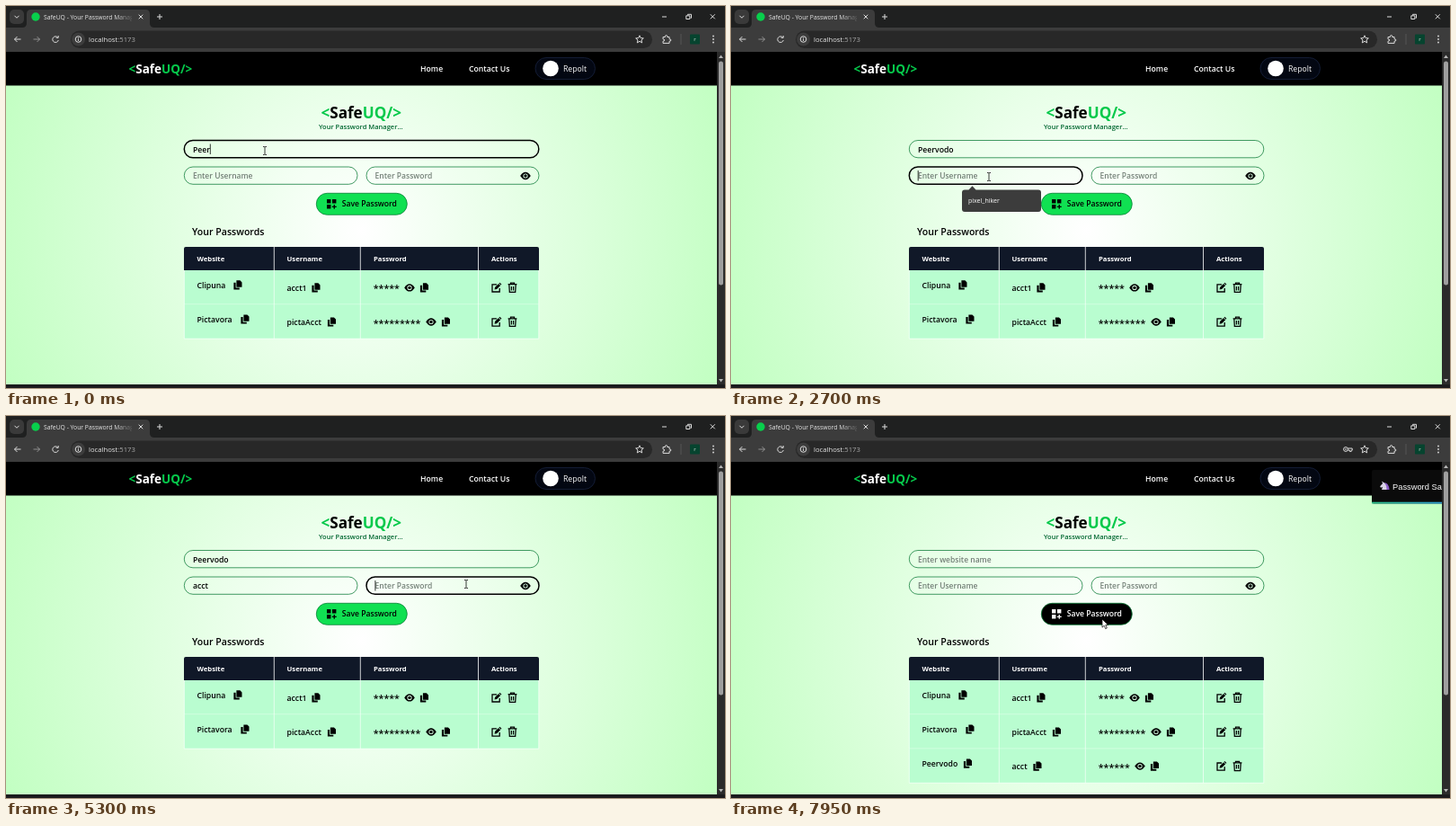
An HTML page for the animation above (8000 ms loop, 800 by 425 pixels).

```html
<!DOCTYPE html>
<html lang="en">
<head>
<meta charset="utf-8">
<title>Password manager</title>
<style>
  html, body { margin: 0; width: 100%; height: 100%; overflow: hidden; background: #000; }
  svg { display: block; width: 100vw; height: 100vh; }
  text { font: 600 8.7px "Open Sans", "Noto Sans", sans-serif; }
  .chrome { font-weight: 400; fill: #e6e6e6; }
  .logo { font-weight: 700; }
  .green { fill: #06c94b; }
  .head { font-size: 7.7px; font-weight: 700; fill: #fff; }
  .stars { font-size: 10.7px; }
  .toast { font: 400 9.3px "Liberation Sans", Arial, sans-serif; fill: #fff; }
  .line { fill: none; stroke: #dcdcdc; stroke-width: 1; }
  .field rect { fill: #fff; fill-opacity: .12; }
</style>
</head>
<body>
<svg viewBox="0 0 800 425" preserveAspectRatio="none">
  <defs>
    <radialGradient id="glow">
      <stop stop-color="#fff"/><stop offset="1" stop-color="#bfffbf"/>
    </radialGradient>
    <linearGradient id="fade">
      <stop offset=".74" stop-color="#e6e6e6"/><stop offset=".93" stop-color="#e6e6e6" stop-opacity=".1"/>
    </linearGradient>
    <linearGradient id="progress">
      <stop stop-color="#2fc58b"/><stop offset=".4" stop-color="#2f9fd0"/><stop offset="1" stop-color="#5856d6"/>
    </linearGradient>
    <clipPath id="page"><rect y="51" width="791" height="370"/></clipPath>
    <clipPath id="tabText"><rect x="40" width="100" height="24"/></clipPath>
    <g id="copy"><path d="M-1.6-5.1h4l2.1 2.1v5.3h-6.1zM-4.6-2.6h2.2v5.8h4.2v1.9h-6.4z"/></g>
    <g id="eye">
      <path d="M-5.8 0Q-3-4.2 0-4.2T5.8 0Q3 4.2 0 4.2T-5.8 0Z"/>
      <circle r="2.6" fill="#d5fbe0"/><circle r="1.7"/>
    </g>
    <g id="edit">
      <path d="M.5-3.6h-5v8.2h8.2v-4" fill="none" stroke="#000" stroke-width="1.3"/>
      <path d="M-2 2.2l.5-2.6 4-4 2.1 2.1-4 4zM3-4.9l.9-.8 2 2-.8.9z"/>
    </g>
    <g id="trash">
      <path d="M-4.9-3.7H4.9M-2-4V-5.3H2V-4M-3.7-3.5l.5 8.4h6.4l.5-8.4M-1.1-1.5v4.5M1.1-1.5v4.5" fill="none" stroke="#000" stroke-width="1.25"/>
    </g>
  </defs>

  <!-- browser frame -->
  <rect width="800" height="425" fill="#1f2020"/>
  <rect x="4" y="4" width="16" height="16" rx="5" fill="#3a3a3a"/>
  <path class="line" d="M9.5 10.8l2.5 2.5 2.5-2.5"/>
  <path d="M18 24q5 0 5-5V9q0-5 5-5H155q5 0 5 5V19q0 5 5 5z" fill="#3c3c3c"/>
  <rect y="24" width="800" height="27" fill="#3c3c3c"/>
  <circle cx="33" cy="12" r="4.7" fill="#08cf4c"/>
  <text class="chrome" x="42" y="14.6" clip-path="url(#tabText)" style="font-size:6.8px;fill:url(#fade)">SafeUQ - Your Password Manager</text>
  <path class="line" d="M147.7 9.7l4.6 4.6m0-4.6l-4.6 4.6M171 9v6m-3-3h6M730 12h5M783.8 9.3l5 5m0-5l-5 5M758.5 10.3v-1h4v4h-1M756.8 10.8h4v3.7h-4z"/>
  <path class="line" d="M16.5 37h-7m3-3l-3 3 3 3M57.6 35a3.3 3.3 0 1 0 .7 3M58.2 33v2.3h-2.4"/>
  <path class="line" d="M30.5 37h7m-3-3l3 3-3 3" stroke-opacity=".5"/>
  <rect x="72" y="27.5" width="647" height="19.5" rx="9.7" fill="#282828"/>
  <circle cx="80.5" cy="37" r="7.5" fill="#3c3c3c"/>
  <circle class="line" cx="80.5" cy="37" r="3.3"/>
  <path class="line" d="M80.5 36.6v2.2m0-3.9v.9"/>
  <text class="chrome" x="92" y="39.8" style="font-size:7.7px">localhost<tspan fill="#aaa">:5173</tspan></text>
  <g id="keyIcon" class="line"><circle cx="684" cy="37" r="2.4"/><circle cx="684" cy="37" r=".4"/><path d="M686.2 36h5v2.2h-1v1.2h-1.8v-1.3h-2.2"/></g>
  <path class="line" d="M705 32.8l1.2 2.8 3.1.3-2.3 2 .7 3-2.7-1.6-2.7 1.6.7-3-2.3-2 3.1-.3z"/>
  <path class="line" d="M731 34.5h2.4q-.3-2 1.2-2t1.2 2h2.3v2.4q1.8-.2 1.8 1.1t-1.8 1.1v2.3H731v-2.2q1.7 0 1.7-1.2T731 36.8z"/>
  <path d="M751 31v12" stroke="#555"/>
  <rect x="761" y="31.5" width="11" height="11" rx="1" fill="#06442f"/>
  <text class="chrome" x="765.2" y="39.2" style="font-size:6px">r</text>
  <g fill="#dcdcdc"><circle cx="787" cy="33.5" r=".9"/><circle cx="787" cy="37" r=".9"/><circle cx="787" cy="40.5" r=".9"/></g>

  <!-- page -->
  <g clip-path="url(#page)"><circle cx="395" cy="250" r="450" fill="url(#glow)"/></g>
  <rect y="51" width="791" height="37.5"/>
  <text class="logo" x="136.5" y="75.2" fill="#fff" style="font-size:13.5px"><tspan class="green">&lt;</tspan>Safe<tspan class="green">UQ/&gt;</tspan></text>
  <g fill="#fff">
    <text x="461" y="73">Home</text>
    <text x="515" y="73">Contact Us</text>
    <rect x="589" y="57.5" width="66.5" height="24" rx="12" fill="#030712" stroke="#18233f" stroke-width=".8"/>
    <circle cx="606" cy="69.5" r="8.8"/>
    <text x="620" y="73" style="font-weight:500">Repolt</text>
  </g>
  <text class="logo" x="350.5" y="125" style="font-size:17.1px"><tspan class="green">&lt;</tspan>Safe<tspan class="green">UQ/&gt;</tspan></text>
  <text x="348" y="137" fill="#016630" style="font-size:7.5px">Your Password Manager...</text>
  <g id="fields"></g>
  <use href="#eye" x="578" y="189"/>
  <g id="button">
    <rect x="345.3" y="208.3" width="101" height="24" rx="12" stroke="#0b7f38" stroke-width=".8"/>
    <path class="ink" d="M357 215h4.4v4.4H357zM363 215h4.4v4.4H363zM357 221h4.4v4.4H357zM364.6 221h1.3v1.7h1.8v1.3h-1.8v1.7h-1.3v-1.7h-1.8v-1.3h1.8z"/>
    <text class="ink" x="373.7" y="223.4" style="font-size:8.6px">Save Password</text>
  </g>
  <text x="207" y="254.8" style="font-size:10.6px">Your Passwords</text>
  <path d="M198 294V270q0-2 2-2H591q2 0 2 2V294z" fill="#101828"/>
  <path d="M298.3 268v26M394.3 268v26M525.5 268v26" stroke="#fff" stroke-width=".8"/>
  <text class="head" x="212.5" y="284">Website</text>
  <text class="head" x="312.5" y="284">Username</text>
  <text class="head" x="409" y="284">Password</text>
  <text class="head" x="540" y="284">Actions</text>
  <g id="rows"></g>

  <!-- autofill suggestion -->
  <g id="popup">
    <path d="M260 204.5h4.5l4-4.3 4 4.3h69.5q3 0 3 3v18.5q0 3-3 3h-82q-3 0-3-3v-18.5q0-3 3-3z" fill="#3c3c3c"/>
    <text class="chrome" x="264" y="219.3" style="font-size:7px;fill:#fff">pixel_hiker</text>
  </g>

  <!-- notification -->
  <g clip-path="url(#page)"><g id="toast">
    <rect y="60" width="187" height="37.5" rx="2" fill="#0b0b0b"/>
    <rect y="95.7" width="187" height="1.8" fill="url(#progress)"/>
    <path d="M11 82l1-3-2 .8-.9-1.5 3-3.3L11 72.5l3 2q4 .5 4.5 7.5z" fill="#d9d3e6"/>
    <path d="M14 74.3q4.8 0 5.5 7.7h-3q.5-4-2.5-7.7z" fill="#8a5cc7"/>
    <text class="toast" x="23" y="81.7">Password Saved!</text>
  </g></g>

  <!-- scrollbar and bottom edge -->
  <rect x="791" y="51" width="9" height="370" fill="#2b2b2b"/>
  <rect x="793" y="61.5" width="5" height="249" rx="2.5" fill="#9f9f9f"/>
  <path d="M793 58l2.5-3.5 2.5 3.5zM793 415l2.5 3.5 2.5-3.5z" fill="#b5b5b5"/>
  <rect y="421.5" width="800" height="4" fill="#1b1a1d"/>

  <path id="ibeam" d="M-2-4.5h1.4l.6.5.6-.5H2M-2 4.5h1.4L0 4l.6.5H2M0-4V4" fill="none" stroke="#222" stroke-width=".9"/>
  <path id="arrow" d="M0 0V9.2L2.2 7.2 3.7 10.7 5.3 10 3.8 6.6H6.7z" fill="#fff" stroke="#000" stroke-width=".7"/>
</svg>
<script>
const LOOP = 8000, SAVE_AT = 7700, TOAST_AT = 7708;
const $ = id => document.getElementById(id);

// keys: times at which each character has been typed
const fields = [
  { x: 198.3, y: 149.5, w: 394.5, hint: "Enter website name", value: "Peervodo",
    keys: [0, 0, 0, 0, 100, 210, 330, 450], focus: 0, blur: 2550 },
  { x: 198.3, y: 179, w: 192.7, hint: "Enter Username", value: "acct",
    keys: [3150, 3300, 3480, 3640], focus: 2550, blur: 5000 },
  { x: 401, y: 179, w: 192, hint: "Enter Password", value: "••••••",
    keys: [5850, 6050, 6240, 6440, 6620, 6850], focus: 5000, blur: SAVE_AT },
];
const pointerPath = [
  [0, 288, 161], [1500, 288, 161], [1850, 286, 175.5], [2250, 286, 175.5], [2500, 287, 190],
  [3950, 287, 190], [4800, 512, 187], [6950, 512, 187], [7500, 413, 226], [LOOP, 413, 226],
];
const savedRows = [
  { site: "Clipuna", siteIcon: 258, login: "acct1", loginIcon: 345, stars: 5, eye: 449 },
  { site: "Pictavora", siteIcon: 266, login: "pictaAcct", loginIcon: 362.5, stars: 9, eye: 473 },
  { site: "Peervodo", siteIcon: 263.5, login: "acct", loginIcon: 341, stars: 6, eye: 455 },
];

const icon = (name, x, y) => `<use href="#${name}" x="${x}" y="${y}"/>`;
$("rows").innerHTML = savedRows.map((r, i) => {
  const y = 294 + 38.1 * i, mid = y + 19.4;
  const dividers = [198.3, 298.3, 394.3, 525.5, 592.8].map(x => `M${x} ${y}v38.1`).join("");
  return `<g><rect x="198.3" y="${y}" width="394.5" height="38.1" fill="#b9fdd0"/>
    <path d="M198.3 ${y + 38.1}h394.5${dividers}" stroke="#fff" stroke-width=".8" stroke-opacity=".8"/>
    <text x="212.5" y="${mid + .3}">${r.site}</text>${icon("copy", r.siteIcon, mid - 3)}
    <text x="312.5" y="${mid + 3.2}">${r.login}</text>${icon("copy", r.loginIcon, mid)}
    <text class="stars" x="408.7" y="${mid + 5}">${"*".repeat(r.stars)}</text>
    ${icon("eye", r.eye, mid)}${icon("copy", r.eye + 16.5, mid)}
    ${icon("edit", 545.5, mid)}${icon("trash", 563.5, mid)}</g>`;
}).join("");
const newRow = $("rows").lastElementChild;

$("fields").innerHTML = fields.map(f => `<g class="field">
  <rect x="${f.x}" y="${f.y}" width="${f.w}" height="19.3" rx="9.65"/>
  <text x="${f.x + 9.6}" y="${f.y + 13.1}"></text>
  <path stroke="#000" stroke-width=".8"/></g>`).join("");
fields.forEach((f, i) => [f.box, f.text, f.caret] = $("fields").children[i].children);

const show = (node, on) => node.style.display = on ? "" : "none";
const inside = (x, y, left, top, w, h) => x >= left && x <= left + w && y >= top && y <= top + h;

function drawField(f, t) {
  const typed = f.keys.filter(k => k <= t), focused = t >= f.focus && t < f.blur;
  const value = t < SAVE_AT ? f.value.slice(0, typed.length) : "";
  f.text.textContent = value || f.hint;
  f.text.style.fill = value ? "#000" : "#748078";
  f.text.style.fontSize = !value ? "8.5px" : value[0] === "•" ? "10px" : "";
  f.box.setAttribute("stroke", focused ? "#000" : "#16803f");
  f.box.setAttribute("stroke-width", focused ? 1.5 : .8);
  const lastInput = Math.max(f.focus, ...typed);
  const caretX = f.x + 9.9 + (value ? f.text.getComputedTextLength() : 0);
  f.caret.setAttribute("d", `M${caretX} ${f.y + 4}v11.5`);
  show(f.caret, focused && Math.floor((t - lastInput) / 500) % 2 === 0);
}

function pointerAt(t) {
  const i = pointerPath.findIndex(p => p[0] > t);
  const [t0, x0, y0] = pointerPath[i - 1], [t1, x1, y1] = pointerPath[i];
  const u = (t - t0) / (t1 - t0), s = u * u * (3 - 2 * u);
  return [x0 + (x1 - x0) * s, y0 + (y1 - y0) * s];
}

function draw(t) {
  fields.forEach(f => drawField(f, t));
  show(newRow, t >= SAVE_AT);
  show($("keyIcon"), t >= fields[2].keys[0]);

  const [x, y] = pointerAt(t);
  const overField = fields.some(f => inside(x, y, f.x, f.y, f.w, 19.3));
  for (const id of ["ibeam", "arrow"]) $(id).setAttribute("transform", `translate(${x} ${y})`);
  show($("ibeam"), overField);
  show($("arrow"), !overField);

  const hover = inside(x, y, 345, 208, 101, 24);
  $("button").firstElementChild.style.fill = hover ? "#000" : "#10e052";
  document.querySelectorAll(".ink").forEach(n => n.style.fill = hover ? "#fff" : "#000");

  // suggestion appears on focus and fades once the typing differs
  const fadeIn = (t - 2600) / 100, fadeOut = (3390 - t) / 160;
  $("popup").style.opacity = Math.max(0, Math.min(1, fadeIn, fadeOut));

  // notification flies in from far right, decelerating
  const u = Math.min(1, Math.max(0, (t - TOAST_AT) / 420));
  const offset = 3000 - 3025 * (1 - (1 - u) ** 3);
  $("toast").setAttribute("transform", `translate(${595 + offset * .586} 0)`);
}

function frame() {
  draw(performance.now() % LOOP);
  requestAnimationFrame(frame);
}
frame();
</script>
</body>
</html>
```
